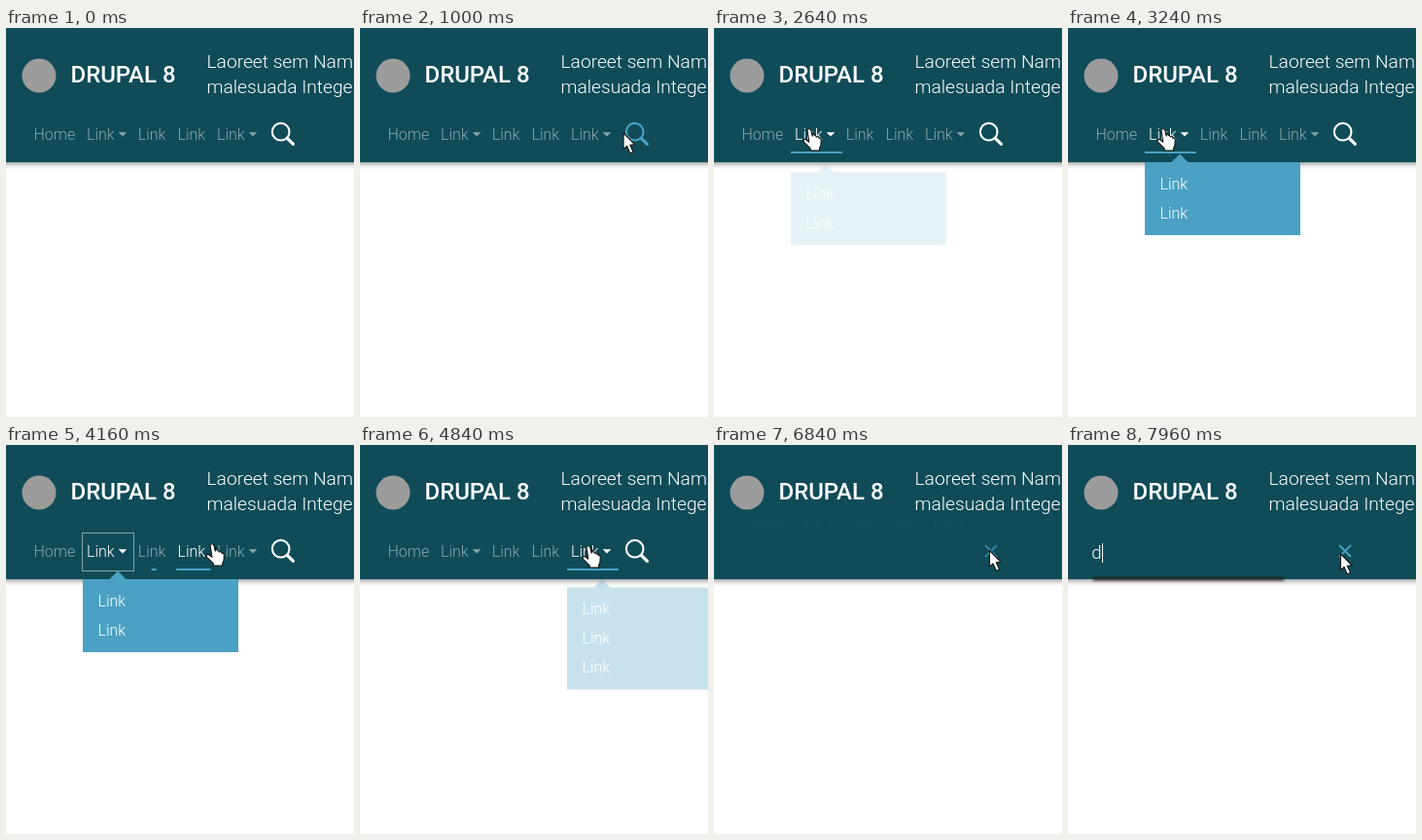
An HTML page that plays this animation: 358 by 400 pixels, repeating every 8000 ms.

```html
<!DOCTYPE html>
<html lang="en">
<head>
<meta charset="utf-8">
<title>Navigation demo</title>
<style>
  html, body { margin: 0; width: 100%; height: 100%; overflow: hidden; background: #fff; }
  svg { display: block; width: 100%; height: 100%; }
  text { font: 300 16px Roboto, "Liberation Sans", sans-serif; fill: #fff; }
  .brand { font-size: 24px; font-weight: 500; }
  .slogan { font-size: 19.2px; }
  .typed { font-size: 18.5px; }
  .header { fill: #0f4c58; filter: drop-shadow(0 1px 3px rgba(0, 0, 0, .55)); }
  .accent { fill: #4aa1c4; }
  .focus { fill: none; stroke: #fff; stroke-dasharray: 1 1; }
  .icon { fill: none; stroke: #fff; stroke-linecap: round; }
  .pointer { fill: #fff; stroke: #111; stroke-width: 1.1; stroke-linejoin: round; }
  .glow { fill: #222; filter: blur(1.8px); }
</style>
</head>
<body>
<svg id="stage" viewBox="0 0 358 400" xmlns="http://www.w3.org/2000/svg">
  <rect class="header" x="-10" y="-10" width="378" height="148"/>
  <circle cx="34" cy="49" r="17.5" fill="#9c9c9c"/>
  <text class="brand" x="66.5" y="56">DRUPAL 8</text>
  <text class="slogan" x="206.5" y="41">Laoreet sem Nam</text>
  <text class="slogan" x="206.5" y="67">malesuada Intege</text>

  <g id="nav"></g>
  <g id="menus"></g>

  <g id="search" class="icon">
    <circle cx="282.7" cy="106.7" r="8.8" stroke-width="2.1"/>
    <path d="M289.8 113.8L295.4 119.4" stroke-width="3.2"/>
  </g>
  <path id="close" d="M279 103L291 115M291 103L279 115" fill="none" stroke="#4aa1c4" stroke-width="1.8"/>

  <rect id="glow" class="glow" x="26" y="135.5" width="196" height="4"/>
  <g id="field">
    <text class="typed" x="24.3" y="117">d</text>
    <rect x="35" y="101" width="1" height="20" fill="#fff"/>
  </g>

  <path id="hand" class="pointer" d="M-2 1.2C-2-.8 1.4-.8 1.8 1.2L3.2 7.2C4-.0 4 6.2 5.6 6.4Q7 6.6 7.2 8Q9.4 7 10 9.2Q12 8.8 12.2 11L12 16Q11.6 18 10.6 19.4V22H1.2V19.8L-5.4 13.4C-7 11.4-4.6 9.6-3 11L-.2 13.2Z"/>
  <path id="arrow" class="pointer" d="M0 0V16.6L3.6 13.4L6.8 20.8L10 19.4L6.8 12.2L11.6 11.8Z"/>
</svg>

<script>
const LOOP = 8000, FADE = 500;
const $ = id => document.getElementById(id);

// Hover spans: [enter, leave] in ms
const ITEMS = [
  { label: "Home", x: 28.5, left: 25, right: 79, hover: [] },
  { label: "Link", x: 83, left: 79, right: 132, caret: 120, hover: [[1890, 3500]],
    open: [2580, 4740], focus: [2580, 4740], links: 2 },
  { label: "Link", x: 135.7, left: 132, right: 172.5, hover: [[1590, 1890], [3500, 3870]] },
  { label: "Link", x: 176.5, left: 172.5, right: 213, hover: [[1350, 1590], [3870, 4180]] },
  { label: "Link", x: 217, left: 213, right: 266, caret: 254, hover: [[1050, 1350], [4180, 5760]],
    open: [4740, 5600], focus: [4740, 6450], links: 3 }
];

// Pointer tip: [ms, x, y]
const PATH = [
  [40, 362, 60], [450, 318, 96], [840, 284, 108], [1050, 266, 108], [1350, 213, 106],
  [1590, 172, 104], [1880, 131, 101], [2300, 104, 104], [2560, 98, 104], [3240, 98, 104],
  [3500, 132, 103], [3870, 172, 102], [4160, 212, 102], [4480, 235, 104], [5600, 235, 104],
  [5760, 266, 106], [6100, 284, 109], [6840, 283.5, 108.5], [7280, 283.5, 108.5],
  [7520, 280.5, 112], [8000, 280.5, 112]
];

const SEARCH_CLICK = 6450;
const within = (t, span) => t >= span[0] && t < span[1];

function el(parent, tag, attrs, content = "") {
  const node = document.createElementNS("http://www.w3.org/2000/svg", tag);
  for (const key in attrs) node.setAttribute(key, attrs[key]);
  node.textContent = content;
  return parent.appendChild(node);
}

// The CSS "ease" curve
function ease(x) {
  if (x <= 0) return 0;
  if (x >= 1) return 1;
  let lo = 0, hi = 1, u = .5;
  for (let i = 0; i < 20; i++) {
    u = (lo + hi) / 2;
    const bx = .75 * u * (1 - u) + u * u * u;
    if (bx < x) lo = u; else hi = u;
  }
  return .3 * u * (1 - u) ** 2 + 3 * u * u * (1 - u) + u ** 3;
}
const since = (t, start, span = FADE) => ease((t - start) / span);

function build() {
  for (const item of ITEMS) {
    item.text = el($("nav"), "text", { x: item.x, y: 115 }, item.label);
    item.line = el($("nav"), "rect", { class: "accent", y: 127, height: 2 });
    if (!item.links) continue;

    const c = item.caret;
    item.mark = el($("nav"), "path", { d: `M${c - 4.3} 107.3H${c + 4.3}L${c} 111.6Z`, fill: "#fff" });
    item.ring = el($("nav"), "rect", {
      class: "focus", x: item.left - .5, y: 90.5, width: item.right - item.left, height: 39
    });
    item.menu = el($("menus"), "g", {});
    const tip = item.left + 36;
    el(item.menu, "path", { class: "accent", d: `M${tip - 9} 138.5L${tip} 129.5L${tip + 9} 138.5Z` });
    el(item.menu, "rect", {
      class: "accent", x: item.left, y: 138, width: 160, height: 15 + 30 * item.links
    });
    for (let i = 0; i < item.links; i++)
      el(item.menu, "text", { x: item.left + 15.5, y: 166 + 30 * i }, "Link");
  }
}

function slope(i, k) {
  const a = PATH[i - 1], p = PATH[i], b = PATH[i + 1];
  if (!a || !b) return 0;
  const s0 = (p[k] - a[k]) / (p[0] - a[0]), s1 = (b[k] - p[k]) / (b[0] - p[0]);
  return s0 * s1 <= 0 ? 0 : 2 * s0 * s1 / (s0 + s1);
}

function pointerAt(t) {
  let i = 0;
  while (i < PATH.length - 2 && t >= PATH[i + 1][0]) i++;
  const a = PATH[i], b = PATH[i + 1], d = b[0] - a[0];
  const u = Math.max(0, (t - a[0]) / d), v = 1 - u;
  return [1, 2].map(k =>
    a[k] * v * v * (1 + 2 * u) + b[k] * u * u * (3 - 2 * u) +
    d * u * v * (v * slope(i, k) - u * slope(i + 1, k)));
}

function drawItem(item, t) {
  const hovered = item.hover.some(s => within(t, s));
  const focused = !!item.focus && within(t, item.focus);
  const shade = hovered || focused ? 1 : .5;
  item.text.setAttribute("fill-opacity", shade);

  let grow = 0;
  for (const [a, b] of item.hover) grow += since(t, a) - since(t, b);
  const width = (item.right - item.left) * grow;
  item.line.setAttribute("x", (item.left + item.right - width) / 2);
  item.line.setAttribute("width", Math.max(0, width));

  if (!item.links) return;
  item.mark.setAttribute("fill-opacity", shade);
  item.ring.setAttribute("opacity", focused && !hovered ? 1 : 0);
  const p = within(t, item.open) ? since(t, item.open[0]) : 0;
  item.menu.setAttribute("opacity", p);
  item.menu.setAttribute("transform", `translate(0 ${12 * (1 - p)})`);
}

function draw(t) {
  ITEMS.forEach(item => drawItem(item, t));

  const away = since(t, SEARCH_CLICK);
  $("nav").setAttribute("opacity", 1 - away);
  $("nav").setAttribute("transform", `translate(0 ${-30 * away})`);

  const onSearch = within(t, [760, 1050]) || t >= 5860;
  $("search").style.stroke = onSearch ? "#4aa1c4" : "#fff";
  $("search").setAttribute("opacity", 1 - since(t, SEARCH_CLICK, 300));
  $("close").setAttribute("opacity", since(t, 6650));
  $("glow").setAttribute("opacity", .85 * since(t, 7780, 160));
  $("field").setAttribute("opacity", t >= 7880 ? 1 : 0);

  const [x, y] = pointerAt(t);
  const onLink = within(t, [1050, 5760]);
  for (const [id, on] of [["hand", onLink], ["arrow", !onLink]]) {
    $(id).setAttribute("transform", `translate(${x} ${y})`);
    $(id).setAttribute("opacity", on && t >= 40 ? 1 : 0);
  }
}

build();
const start = performance.now();
function tick() {
  draw((performance.now() - start) % LOOP);
  requestAnimationFrame(tick);
}
tick();
</script>
</body>
</html>
```
